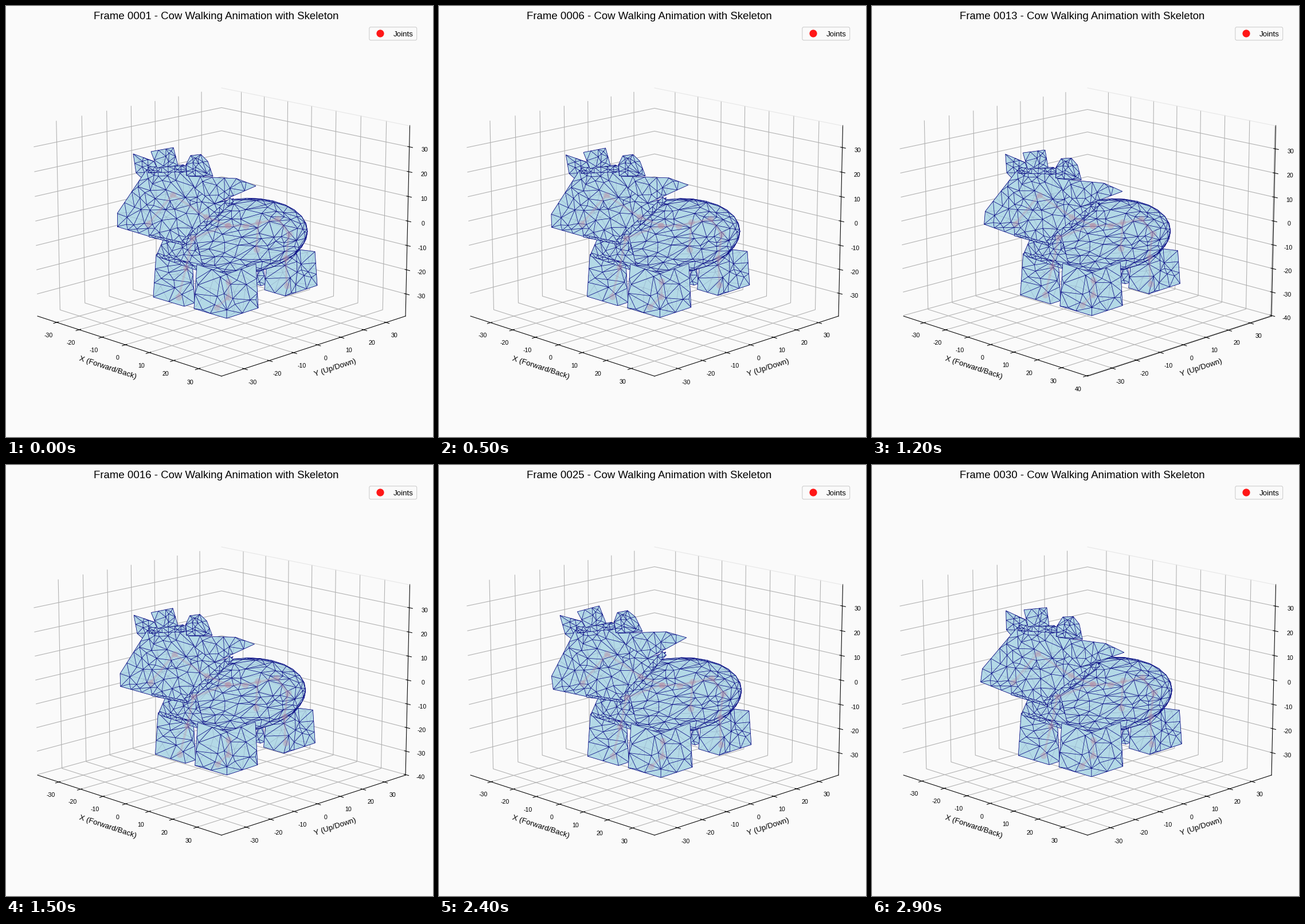
These frames come from a looping animation (745 by 752 pixels, 3000 ms). A matplotlib script:

```python
import numpy as np
import matplotlib.pyplot as plt
from matplotlib.animation import FuncAnimation
from matplotlib.collections import LineCollection
from matplotlib.patches import Circle, FancyBboxPatch, Polygon
from matplotlib.path import Path
from matplotlib.tri import Triangulation

W, H, DPI = 745, 752, 96
FRAMES, INTERVAL = 30, 100
BG, SKIN, WIRE, BACK_WIRE, BONE = "#fafafa", "#b3d9e6", "#000080", "#96b0cb", "#b98ea3"

plt.rcParams.update({"font.family": "Liberation Sans", "axes.unicode_minus": False})

# Head nod: -0.4 is fully lowered, 0.6 fully raised.
NOD_TIMES = [0, 5, 9, 15, 20, 24, 29, 30]
NODS = [0, -.07, .6, -.1, .13, -.4, .4, 0]
Z_CENTRE = -.33
CENTRE = np.array([376, 377])
X_UNIT = np.array([4.16, 1.08])


def nod(t):
    i = np.searchsorted(NOD_TIMES, t, side="right") - 1
    u = (t - NOD_TIMES[i]) / (NOD_TIMES[i + 1] - NOD_TIMES[i])
    return NODS[i] + (NODS[i + 1] - NODS[i]) * (1 - np.cos(np.pi * u)) / 2


def half_range(t):
    return 39.42 - .53 * np.cos(2 * np.pi * t / 26)


def x_centre(t):
    return .12 + 1.25 * nod(t)


def view(points, t):
    """Follow the axis limits, which fit themselves to the cow."""
    shift = (x_centre(t) - x_centre(0)) * X_UNIT
    return CENTRE + (points - CENTRE - shift) * half_range(0) / half_range(t)


def turn_head(points, t):
    x, y = points.T
    return points + nod(t) * np.column_stack([.32 * (362 - y), .2 * (x - 268)])


def subdivide(corners, step):
    pairs = zip(corners, np.roll(corners, -1, axis=0))
    return np.vstack([np.linspace(a, b, max(1, round(np.hypot(*(b - a)) / step)),
                                  endpoint=False) for a, b in pairs])


def triangulate(corners, step, rng):
    """Scatter points in a polygon; return them with their triangle edges."""
    points = subdivide(corners, 1.2 * step)
    shape = Path(np.vstack([corners, corners[:1]]))
    lo, hi = corners.min(0), corners.max(0)
    tries = int(1.6 * np.prod(hi - lo) / step ** 2)
    for p in rng.uniform(lo, hi, (tries, 2)):
        if np.hypot(*(points - p).T).min() > .42 * step and shape.contains_point(p):
            points = np.vstack([points, p])
    tri = Triangulation(*points.T)
    a, b, c = points[tri.triangles].transpose(1, 0, 2)
    (ux, uy), (vx, vy) = (b - a).T, (c - a).T
    flat = np.abs(ux * vy - uy * vx) < .01 * step ** 2
    tri.set_mask(flat | ~shape.contains_points((a + b + c) / 3))
    return points, tri.edges


class Part:
    """Flat skin with faint far-side wires and dark near-side wires."""
    count = 0

    def __init__(self, step, corners, head=False, warp=lambda p: p):
        Part.count += 1
        rng = np.random.default_rng(Part.count)
        corners = np.array(corners, float)
        self.head = head
        self.outline = warp(subdivide(corners, step))
        self.skin = stage.add_patch(Polygon(self.outline, fc=SKIN, lw=0,
                                            zorder=Part.count))
        self.wires = []
        for size, color, lw in [(1.3 * step, BACK_WIRE, .45), (step, WIRE, .55)]:
            points, edges = triangulate(corners, size, rng)
            art = LineCollection([], colors=color, linewidths=lw, zorder=Part.count)
            stage.add_collection(art, autolim=False)
            self.wires.append((warp(points), edges, art))

    def place(self, points, t):
        return view(turn_head(points, t) if self.head else points, t)

    def update(self, t):
        self.skin.set_xy(self.place(self.outline, t))
        for points, edges, art in self.wires:
            art.set_segments(self.place(points, t)[edges])


def leg(x, y, left, right, height, peak=0):
    """Box leg seen on its front edge, whose foot is at (x, y)."""
    a, b = (x - left, y - .3 * left), (x + right, y - .33 * right)
    return [a, (x, y), b, (b[0] - 4, b[1] - height), (x, y - height - peak),
            (a[0] + 5, a[1] - height)]


def strip(start, end, width):
    a, b = np.array(start, float), np.array(end, float)
    d = (b - a) / np.hypot(*(b - a))
    side = np.array([-d[1], d[0]]) * width / 2
    return [a + side, b + side, b - side, a - side]


def trunk(disc):
    """Dome over the unit disc, seen from above, as a tilted ellipse."""
    r = np.hypot(*disc.T)[:, None]
    x, y = (disc * np.sin(np.pi / 2 * r) / np.maximum(r, 1e-6)).T
    return np.column_stack([408 + 118 * x, 402 + 66 * y - 9 * x])


fig = plt.figure(figsize=(W / DPI, H / DPI), dpi=DPI, facecolor=BG)

# Box with grid and ticks
side = 713.6
ax = fig.add_axes([9.6 / W, 8.9 / H, side / W, side / H], projection="3d")
ax.patch.set_visible(False)
ax.view_init(elev=15, azim=-45)
ax.set_xlabel("X (Forward/Back)", fontsize=10)
ax.set_ylabel("Y (Up/Down)", fontsize=10)
for axis in (ax.xaxis, ax.yaxis, ax.zaxis):
    axis.pane.set_visible(False)
    axis.set_ticks(range(-40, 41, 10))
ax.tick_params(labelsize=8)

# Flat stage in pixels
stage = fig.add_axes([0, 0, 1, 1], zorder=5)
stage.set(xlim=(0, W), ylim=(H, 0))
stage.axis("off")
stage.plot([376, 704], [143, 209], color="#e6e6e6", lw=.8, zorder=0)
title = stage.text(366.5, 23, "", fontsize=14, ha="center", va="baseline")
stage.add_patch(FancyBboxPatch((636.5, 39.5), 77.5, 17.5, boxstyle="round,pad=2.7",
                               fc=BG, ec="#cccccc", lw=.8))
stage.add_patch(Circle((653, 48), 6.6, color="#ff1717", lw=0))
stage.text(675.6, 52.7, "Joints", fontsize=10, va="baseline")

# Body parts from back to front
angles = np.linspace(0, 2 * np.pi, 30, endpoint=False)
circle = np.column_stack([np.cos(angles), np.sin(angles)])
chest = [(278, 400), (330, 400), (347, 468), (320, 447), (263, 434)]
left_ear = [(222, 258), (258, 271), (264, 284), (240, 303), (227, 291)]
face = [(245, 286), (194, 362), (194, 385), (250, 402), (311, 416), (372, 366),
        (397, 336), (364, 345), (345, 297), (309, 277), (264, 281)]
right_ear = [(318, 297), (402, 301), (436, 314), (397, 331), (364, 345), (330, 318)]
left_horn = [(253, 254), (292, 247), (300, 278), (264, 283)]
right_horn = [(322, 261), (340, 259), (352, 271), (361, 297), (315, 296), (314, 277)]

parts = [
    Part(13, leg(445, 488, 9, 8, 30)),
    Part(19, leg(487, 506, 36, 56, 59, peak=25)),
    Part(.15, circle, warp=trunk),
    Part(23, leg(311, 524, 54, 18, 74)),
    Part(13, chest),
    Part(9, strip((264, 434), (345, 462), 6)),
    Part(22, leg(385, 545, 57, 55, 77)),
    Part(14, left_ear, head=True),
    Part(18, face, head=True),
    Part(9, strip((250, 401), (311, 415), 4), head=True),
    Part(10, strip((311, 412), (394, 338), 9), head=True),
    Part(18, right_ear, head=True),
    Part(9, strip((248, 286), (318, 284), 10), head=True),
    Part(13, left_horn, head=True),
    Part(11, right_horn, head=True),
]

# Skeleton showing faintly through the skin
BONES = [np.array(b, float) for b in (
    [(248, 380), (291, 329), (349, 368), (387, 383), (418, 384), (474, 371),
     (494, 398), (488, 440), (490, 488)],
    [(440, 377), (437, 425)],
    [(387, 383), (325, 405), (314, 457), (301, 508)],
    [(388, 481), (388, 508), (368, 526)],
)]
JOINTS = np.vstack(BONES)
bones = LineCollection([], colors=BONE, linewidths=3, alpha=.3, zorder=50)
stage.add_collection(bones, autolim=False)
joints = stage.scatter(*JOINTS.T, s=70, color=BONE, alpha=.35, lw=0, zorder=50)


def update(t):
    half, cx = half_range(t), x_centre(t)
    ax.set_xlim(cx - half, cx + half)
    ax.set_ylim(-half, half)
    ax.set_zlim(Z_CENTRE - half, Z_CENTRE + half)
    for part in parts:
        part.update(t)
    bones.set_segments([view(b, t) for b in BONES])
    joints.set_offsets(view(JOINTS, t))
    title.set_text(f"Frame {t + 1:04d} - Cow Walking Animation with Skeleton")
    return []


anim = FuncAnimation(fig, update, frames=FRAMES, interval=INTERVAL, repeat=True)
plt.show()
```
